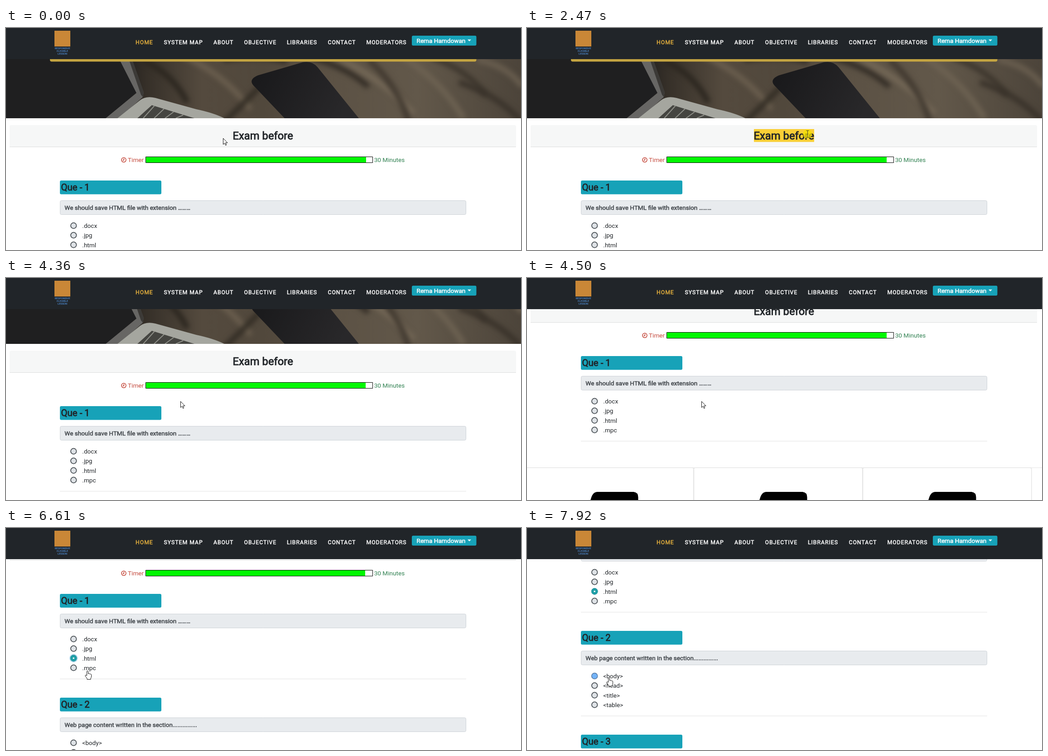
These frames come from a looping animation (1137 by 492 pixels, 8000 ms). An HTML page with a canvas:

```html
<!DOCTYPE html>
<html lang="en">
<head>
<meta charset="utf-8">
<title>Exam page</title>
<style>
html, body { margin: 0; width: 100%; height: 100%; overflow: hidden; background: #fff; }
canvas { display: block; }
</style>
</head>
<body>
<canvas id="stage" width="1137" height="492"></canvas>
<script>
const W = 1137, H = 492, LOOP = 8000;
const ctx = document.getElementById('stage').getContext('2d');
const INK = '#212529', TEAL = '#17a2b8';
const BLOCK = 230, OPTION = 21.25;

const NAV = [['HOME', 286], ['SYSTEM MAP', 348.5], ['ABOUT', 458], ['OBJECTIVE', 525.5],
  ['LIBRARIES', 620], ['CONTACT', 710.5], ['MODERATORS', 795.5]];

const QUESTIONS = [
  { text: 'We should save HTML file with extension ………',
    options: ['.docx', '.jpg', '.html', '.mpc'], pick: 2, press: 5590 },
  { text: 'Web page content written in the section...............',
    options: ['<body>', '<head>', '<title>', '<table>'], pick: 0, press: 7660 },
  { text: '', options: [], pick: -1, press: Infinity }
];
const REVEAL = 150;

// time, x, y
const POINTER = [
  [280, 479, 244], [620, 497, 237], [830, 497, 237], [860, 499, 238], [1080, 518, 242],
  [1260, 518, 242], [2000, 629, 242], [2200, 629, 242], [2440, 619, 235],
  [3000, 619, 235], [3730, 415, 258], [4030, 415, 258], [4160, 385, 273],
  [4870, 385, 273], [5130, 181, 317], [5250, 181, 317], [5360, 181, 313],
  [6410, 181, 313], [6440, 180, 316], [7030, 180, 316], [7300, 180, 334],
  [7510, 180, 334], [7540, 181, 331]
];

const clamp = v => Math.max(0, Math.min(1, v));
const smooth = v => { v = clamp(v); return v * v * (3 - 2 * v); };

function along(keys, t) {
  const i = keys.findIndex(k => k[0] > t);
  if (i === 0) return keys[0].slice(1);
  if (i < 0) return keys[keys.length - 1].slice(1);
  const [a, b] = [keys[i - 1], keys[i]];
  const u = smooth((t - a[0]) / (b[0] - a[0]));
  return [a[1] + (b[1] - a[1]) * u, a[2] + (b[2] - a[2]) * u];
}

function scrollAt(t) {
  return 170 * (smooth((t - 4260) / 270) + smooth((t - 6550) / 270));
}

function text(str, x, y, size, color, bold) {
  ctx.font = `${size}px Roboto, sans-serif`;
  ctx.fillStyle = color;
  ctx.fillText(str, x, y);
  if (bold) {
    ctx.strokeStyle = color;
    ctx.lineWidth = size / 26;
    ctx.lineJoin = 'round';
    ctx.strokeText(str, x, y);
  }
}

function box(x, y, w, h, r, fill, stroke) {
  ctx.beginPath();
  ctx.roundRect(x, y, w, h, r);
  if (fill) { ctx.fillStyle = fill; ctx.fill(); }
  if (stroke) { ctx.strokeStyle = stroke; ctx.lineWidth = 1; ctx.stroke(); }
}

function disc(x, y, r, fill, alpha = 1, c = ctx) {
  c.globalAlpha = alpha;
  c.fillStyle = fill;
  c.beginPath();
  c.arc(x, y, r, 0, 7);
  c.fill();
  c.globalAlpha = 1;
}

function shape(c, points, fill) {
  c.beginPath();
  points.forEach(([x, y]) => c.lineTo(x, y));
  c.closePath();
  c.fillStyle = fill;
  c.fill();
}

function paintBanner() {
  const canvas = document.createElement('canvas');
  canvas.width = W;
  canvas.height = 131;
  const c = canvas.getContext('2d');
  c.translate(0, -69);

  const cloth = c.createLinearGradient(0, 0, W, 0);
  [[0, '#202021'], [.22, '#1d1c1c'], [.27, '#352f28'], [.38, '#544a3e'], [.5, '#51483c'],
   [.62, '#5b5144'], [.8, '#62584a'], [1, '#4c443a']].forEach(s => cloth.addColorStop(...s));
  c.fillStyle = cloth;
  c.fillRect(0, 69, W, 131);

  c.filter = 'blur(6px)';
  c.lineWidth = 12;
  [[300, 70, 400, 165, '#2b261f'], [390, 60, 540, 180, '#6a5e4e'], [480, 70, 620, 75, '#312b24'],
   [650, 60, 800, 130, '#332d26'], [720, 60, 900, 190, '#746857'], [800, 70, 890, 210, '#40382f'],
   [870, 60, 1010, 200, '#6d6252'], [940, 65, 1060, 150, '#3d362d'], [1000, 120, 1140, 210, '#39322a'],
   [1040, 70, 1140, 130, '#695e4f'], [480, 210, 560, 130, '#332d25']].forEach(([x, y, x2, y2, color]) => {
    c.strokeStyle = color;
    c.beginPath();
    c.moveTo(x, y);
    c.quadraticCurveTo((x + x2) / 2 + 18, (y + y2) / 2 - 16, x2, y2);
    c.stroke();
  });
  c.filter = 'none';

  // laptop lid and keyboard
  shape(c, [[0, 69], [250, 69], [288, 143], [220, 200], [0, 200]], '#1f1f20');
  shape(c, [[250, 69], [278, 69], [304, 143], [302, 153], [250, 200], [220, 200], [288, 144]], '#676664');
  shape(c, [[271, 69], [278, 69], [304, 143], [302, 153], [298, 148]], '#3c3a37');
  c.beginPath();
  c.moveTo(246, 200);
  c.lineTo(296, 160);
  c.quadraticCurveTo(309, 150, 330, 155);
  c.lineTo(420, 180);
  c.quadraticCurveTo(458, 188, 482, 200);
  c.fillStyle = '#a5a69f';
  c.fill();
  shape(c, [[290, 200], [322, 171], [416, 200]], '#454541');
  c.strokeStyle = '#90918a';
  c.lineWidth = 2;
  for (let i = 0; i < 4; i++) {
    c.beginPath();
    c.moveTo(303 + i * 24, 200);
    c.lineTo(328 + i * 21, 172 + i * 7);
    c.stroke();
  }

  // phone
  const glass = c.createLinearGradient(550, 100, 740, 200);
  glass.addColorStop(0, '#19191b');
  glass.addColorStop(1, '#29282a');
  c.beginPath();
  c.moveTo(615, 200);
  c.lineTo(546, 127);
  c.quadraticCurveTo(535, 114, 556, 105);
  c.lineTo(655, 76);
  c.quadraticCurveTo(676, 72, 688, 87);
  c.lineTo(779, 200);
  c.fillStyle = glass;
  c.fill();
  return canvas;
}
const banner = paintBanner();

function drawRadio(x, y, age, focused) {
  if (focused) disc(x, y, 9.3, '#b5dcf0');
  disc(x, y, 7.2, '#4d5358');
  disc(x, y, 5.4, '#dee2e6');
  if (age <= 0) return;
  disc(x, y, 5.4, '#b7e0ee', clamp(age / 150));
  disc(x, y, 7.2, '#5f86b4', clamp((age - 230) / 30));
  disc(x, y, 5.6, '#74b4f8', clamp((age - 230) / 30));
  disc(x, y, 7.2, '#1f9fa6', clamp((age - 270) / 110));
  if (age > 320) disc(x, y, 1.8, '#fff');
}

function drawQuestion(q, index, t) {
  const y = index * BLOCK;
  box(119, 338 + y, 224, 30.5, 3, TEAL);
  text(`Que - ${index + 1}`, 121.5, 360 + y, 20.4, INK, true);
  box(119.5, 382.5 + y, 896, 31, 3, '#e8ebee', '#cdd2d7');
  text(q.text, 129.3, 403 + y, 13.6, '#41464b', true);
  const next = QUESTIONS[index + 1];
  q.options.forEach((label, i) => {
    const oy = 438 + y + i * OPTION;
    const age = i === q.pick ? t - q.press : 0;
    drawRadio(149.2, oy, age, age > 380 && t < next.press);
    text(label, 168.3, oy + 5, 13.6, INK);
  });
  ctx.fillStyle = '#e2e2e2';
  ctx.fillRect(119, 526 + y, 897, 1);
}

function drawCards(y) {
  ctx.fillStyle = '#e3e3e3';
  ctx.fillRect(0, y, W, 1);
  for (let i = 0; i < 3; i++) {
    const x = -4.5 + i * 373;
    box(x, y + .5, 372.5, 260, 3, '#fff', '#d9d9d9');
    ctx.fillStyle = '#000';
    ctx.beginPath();
    ctx.moveTo(x + 134, y + 104);
    ctx.lineTo(x + 146, y + 68);
    ctx.quadraticCurveTo(x + 150, y + 54, x + 160, y + 54);
    ctx.lineTo(x + 240, y + 54);
    ctx.quadraticCurveTo(x + 250, y + 55, x + 250, y + 66);
    ctx.lineTo(x + 250, y + 104);
    ctx.fill();
  }
}

function drawTimer(t) {
  const red = '#c4493c';
  ctx.strokeStyle = red;
  ctx.lineWidth = 1.6;
  ctx.beginPath();
  ctx.arc(260, 292.3, 5, 0, 7);
  ctx.moveTo(260.3, 289);
  ctx.lineTo(260.3, 293);
  ctx.lineTo(257.5, 293);
  ctx.stroke();
  text('Timer', 269, 297, 13.6, red);
  box(308.5, 285.5, 501, 13, 0, '#fff', '#000');
  ctx.fillStyle = '#00f800';
  ctx.fillRect(309, 286, 486 - (t > 1400) - (t > 5000), 12);
  text('30 Minutes', 812.7, 297, 13.6, '#2f8050');
}

function drawTitle(t, pointerX) {
  box(8, 215, 1118, 49, [4, 4, 0, 0], '#f6f7f7');
  ctx.fillStyle = '#dcdddd';
  ctx.fillRect(8, 263, 1118, 1);
  if (t >= 1280 && t < 2720) {
    const end = t > 1950 ? 634 : Math.min(634, pointerX + 3);
    ctx.fillStyle = '#f9cf36';
    ctx.fillRect(501, 224, end - 501, 28.5);
  }
  text('Exam before', 500.5, 247, 23.8, INK, true);
}

function drawHeader() {
  ctx.fillStyle = INK;
  ctx.fillRect(0, 0, W, 69);
  ctx.fillStyle = '#c98737';
  ctx.fillRect(107, 6, 35, 35);
  ctx.textAlign = 'center';
  ['RESPONSIVE', 'FLEXIBLE', 'LESSON'].forEach((word, i) =>
    text(word, 124.5, 46.5 + i * 6, 5.8, '#4a80c0', true));
  ctx.textAlign = 'left';

  ctx.letterSpacing = '0.95px';
  NAV.forEach(([label, x], i) => text(label, x, 36, 12.3, i ? '#fff' : '#e2ae3d', true));
  ctx.letterSpacing = '0px';

  box(896, 17, 142.5, 22, 3, TEAL);
  text('Rema Hamdowan', 906.5, 32.7, 13.6, '#fff', true);
  shape(ctx, [[1019, 25.5], [1027, 25.5], [1023, 29.5]], '#fff');
}

function outline(path) {
  ctx.fillStyle = '#fff';
  ctx.strokeStyle = '#111';
  ctx.lineWidth = 1;
  ctx.lineJoin = 'round';
  ctx.fill(path);
  ctx.stroke(path);
}
const ARROW = new Path2D('M.5 .5V14L3.6 11.2L5.8 16L7.8 15.1L5.7 10.4H10Z');
const HAND = new Path2D('M-1.5 11V1.5Q0 -.5 1.5 1.5V7Q3 5.7 4.2 7.4Q5.8 6.3 6.8 8Q8.5 7.5 8.5 9.5V13' +
  'Q8.5 15.5 7 17V19.5H-1V17.5L-5 12Q-5.5 9.5 -3.3 10Z');

function drawPointer(t, [x, y]) {
  if (t >= 860 && t < 2720) disc(x, y, 10, '#f2e200', .75);
  ctx.save();
  ctx.translate(Math.round(x), Math.round(y));
  if (t > 5040) {
    outline(HAND);
  } else if (t >= 850 && x > 498 && x < 636 && y < 252) {
    ctx.strokeStyle = '#4a4630';
    ctx.lineWidth = 1;
    ctx.beginPath();
    ctx.moveTo(-2.5, -7.5);
    ctx.lineTo(3.5, -7.5);
    ctx.moveTo(.5, -7.5);
    ctx.lineTo(.5, 7.5);
    ctx.moveTo(-2.5, 7.5);
    ctx.lineTo(3.5, 7.5);
    ctx.stroke();
  } else {
    outline(ARROW);
  }
  ctx.restore();
}

function draw(t) {
  const pointer = along(POINTER, t);
  const shown = 1 + QUESTIONS.filter(q => t >= q.press + REVEAL).length;
  ctx.fillStyle = '#fff';
  ctx.fillRect(0, 0, W, H);

  ctx.save();
  ctx.translate(0, -Math.round(scrollAt(t)));
  ctx.drawImage(banner, 0, 69);
  box(97, 60, 941.5, 14.5, 4, '#c4a441');
  drawTitle(t, pointer[0]);
  drawTimer(t);
  drawCards(585 + (shown - 1) * BLOCK);
  QUESTIONS.slice(0, shown).forEach((q, i) => drawQuestion(q, i, t));
  ctx.restore();

  drawHeader();
  drawPointer(t, pointer);
}

function tick() {
  draw(performance.now() % LOOP);
  requestAnimationFrame(tick);
}
tick();
</script>
</body>
</html>
```
